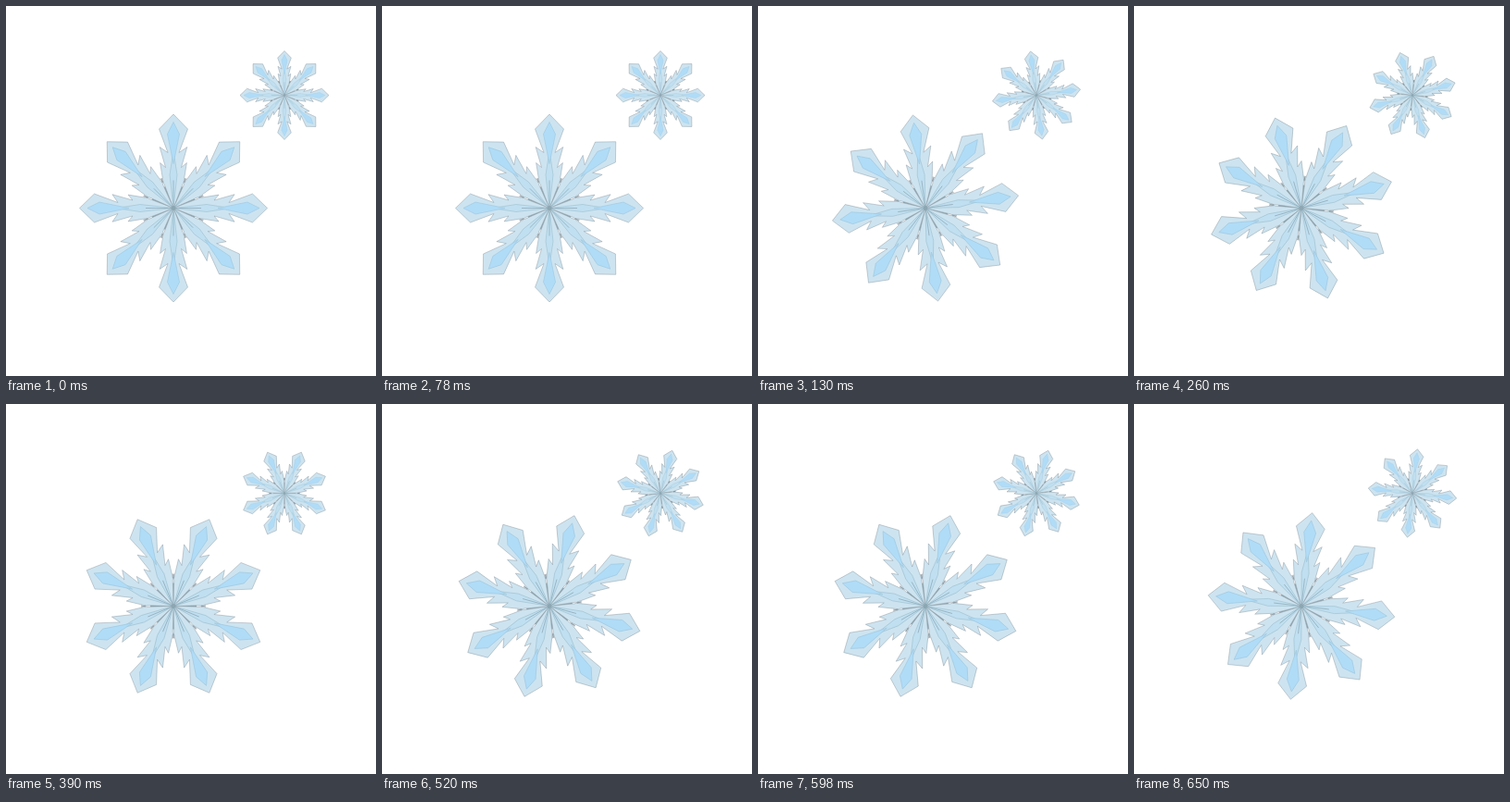
An HTML page for the animation above (0.78 s loop, 400 by 400 pixels).

```html
<!DOCTYPE html>
<html lang="en">
<head>
<meta charset="utf-8">
<title>Snowflakes</title>
<style>
  html, body { margin: 0; width: 100%; height: 100%; overflow: hidden; background: #fff; }
  svg { display: block; width: 100vw; height: 100vh; }
  .edge { fill: #cde4f0; stroke: #7b8a92; stroke-width: .4; vector-effect: non-scaling-stroke; }
  .stem { fill: #c0dff0; stroke: #9dbfd0; stroke-width: .6; }
  .gem { fill: #b0dcf8; stroke: #9cc6dd; stroke-width: .6; }
  .ray { stroke: #93aebb; stroke-width: .8; }
  .gap { fill: #8ba1ac; }
</style>
</head>
<body>
<svg viewBox="0 0 400 400">
  <defs>
    <g id="arm"></g>
    <g id="flake"></g>
  </defs>
  <g transform="translate(181 218.5)"><use class="spin" href="#flake"/></g>
  <g transform="translate(301 96.5) scale(.473)"><use class="spin" href="#flake"/></g>
</svg>
<script>
const STEP = 130;
const ANGLES = [0, -7.7, -16.3, -22.5, -29.6, -38.4];

// Each barb is a notch followed by an outward point.
const barb = i => [[6 + 2.5 * i, 16 * i - 60], [14.8 - .4 * i, 17 * i - 66]];
// Right half of an arm pointing up, from the tip to the centre.
const half = [[0, -101.5], [15.5, -85.5], ...[0, 1, 2].flatMap(barb), [10, -26], [0, 0]];

const mirror = pts => [...pts, ...pts.slice(1, -1).reverse().map(([x, y]) => [-x, y])];
const poly = (cls, pts) => `<polygon class="${cls}" points="${mirror(pts).join(' ')}"/>`;
const ring = art => Array.from({ length: 8 }, (_, i) =>
  `<g transform="rotate(${i * 45})">${art}</g>`).join('');

document.getElementById('arm').innerHTML =
  poly('edge', half) +
  poly('stem', [[0, -62], [4, -36], [0, 0]]) +
  poly('gem', [[0, -93], [6.5, -80], [0, -48]]) +
  '<path class="ray" d="M0 0V-30"/>';

document.getElementById('flake').innerHTML =
  ring('<use href="#arm"/>') +
  ring('<path class="gap" transform="rotate(22.5)" d="M0 0L-.7 -25L.7 -25Z"/>') +
  '<circle r="2.4" fill="#8ca6b2"/>';

const spins = document.querySelectorAll('.spin');
function draw(now) {
  const i = Math.floor(now / STEP) % ANGLES.length;
  spins.forEach(el => el.setAttribute('transform', `rotate(${ANGLES[i]})`));
  requestAnimationFrame(draw);
}
draw(0);
</script>
</body>
</html>
```
